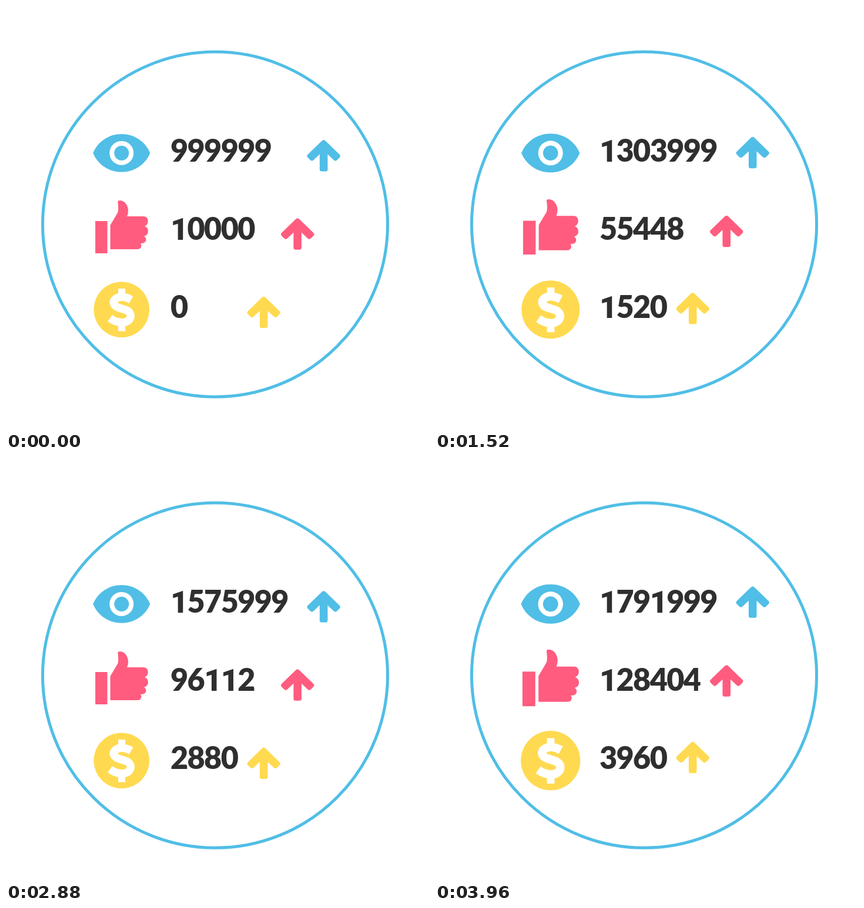
Animation of 720 by 720 pixels, one loop 4 s. Source, as an HTML page:

```html
<!DOCTYPE html>
<html lang="en">
<head>
<meta charset="utf-8">
<title>Rising counters</title>
<style>
  html, body { margin: 0; width: 100%; height: 100%; overflow: hidden; background: #fff; }
  svg { display: block; width: 100vw; height: 100vh; }
  .blue { fill: #50bee6; }
  .pink { fill: #ff5c7f; }
  .yellow { fill: #ffda50; }
  .white { fill: #fff; }
  .count { font: 900 52px Lato, sans-serif; letter-spacing: -1.6px; fill: #2f2f2f; }
  .one { font-family: Roboto, sans-serif; }
</style>
</head>
<body>
<svg viewBox="0 0 720 720">
  <defs>
    <path id="arrow" d="M0 0Q1.5 0 3 1.5L27 24.8Q29.5 27.5 27 30L22.5 34.5Q20 36.5 17.5 34.5L6.8 24.3V50Q6.8 53.5 3.3 53.5H-3.3Q-6.8 53.5-6.8 50V24.3L-17.5 34.5Q-20 36.5-22.5 34.5L-27 30Q-29.5 27.5-27 24.8L-3 1.5Q-1.5 0 0 0Z"/>
  </defs>

  <circle cx="356" cy="371.7" r="293.6" fill="none" stroke="#50bee6" stroke-width="5"/>

  <g id="eye">
    <path class="blue" d="M148.2 250.3C156 231 174.7 218 196.7 218S237.400 231 245.200 250.300C237.400 269.600 218.700 282.600 196.700 282.600S156 269.600 148.200 250.300Z"/>
    <circle class="white" cx="196.700" cy="250.300" r="20.500"/>
    <circle class="blue" cx="196.700" cy="250.300" r="12.500"/>
  </g>

  <g id="thumb" class="pink">
    <path d="M152 366H172.500V421H152Z"/>
    <path d="M177.500 414V373L190 352C192 347 191 340 190.300 333Q190.300 331 194 331C203 331 208 341 208 348Q208 354 206 358H234C241 358 243 365 241 370Q240 373 236 375C243 377 243 386 240 389Q238 391 235 392C240 395 239 401 235 403Q232 404 229 404C232 408 230 414 224 414Z"/>
  </g>

  <g id="coin">
    <circle class="yellow" cx="196.700" cy="516.700" r="47.300"/>
    <path class="white" d="M191 481H203V495H191ZM191 538H203V553.500H191Z"/>
    <path fill="none" stroke="#fff" stroke-width="13.500" d="M213 500Q203 494.500 194 495.500C180 498 180 510 192 513.500L203 517C216 521 215 536 201 538.500Q189 540 177 531.500"/>
  </g>

  <text id="views" class="count" x="280" y="265"></text>
  <text id="likes" class="count" x="280" y="398"></text>
  <text id="money" class="count" x="280" y="531"></text>

  <use id="up-views" class="blue" href="#arrow"/>
  <use id="up-likes" class="pink" href="#arrow"/>
  <use id="up-money" class="yellow" href="#arrow"/>
</svg>

<script>
const LOOP = 4000, STEP = 40;

const counters = [
  { id: 'views', from: 999999, perMs: 200 },
  { id: 'likes', from: 10000, perMs: 29.9 },
  { id: 'money', from: 0, perMs: 1 },
];
const icons = [
  { id: 'eye', x: 196.7, y: 250.3, grow: 0.07 },
  { id: 'thumb', x: 197, y: 376, grow: 0.14 },
  { id: 'coin', x: 196.7, y: 516.7, grow: 0.14 },
];
const arrows = [
  { id: 'up-views', x: 540.7, y: 228, rise: 7.7 },
  { id: 'up-likes', x: 496.2, y: 361.3, rise: 7 },
  { id: 'up-money', x: 438.7, y: 494.6, rise: 9.8 },
];
for (const part of [...counters, ...icons, ...arrows]) part.node = document.getElementById(part.id);

// Triangle wave: 0 at the start of each period, 1 halfway through.
const triangle = (t, period) => 1 - Math.abs(1 - 2 * (t % period) / period);

function render(t) {
  for (const { node, from, perMs } of counters) {
    const digits = String(Math.round(from + perMs * t));
    node.innerHTML = digits.replace(/1/g, '<tspan class="one">1</tspan>');
  }
  for (const { node, x, y, grow } of icons) {
    const scale = 1 + grow * triangle(t, 480);
    node.setAttribute('transform', `translate(${x} ${y}) scale(${scale}) translate(${-x} ${-y})`);
  }
  for (const { node, x, y, rise } of arrows) {
    node.setAttribute('transform', `translate(${x} ${y - rise * triangle(t, 240)})`);
  }
}

const start = performance.now();
function tick() {
  const elapsed = (performance.now() - start) % LOOP;
  render(Math.floor(elapsed / STEP) * STEP);
  requestAnimationFrame(tick);
}
tick();
</script>
</body>
</html>
```
